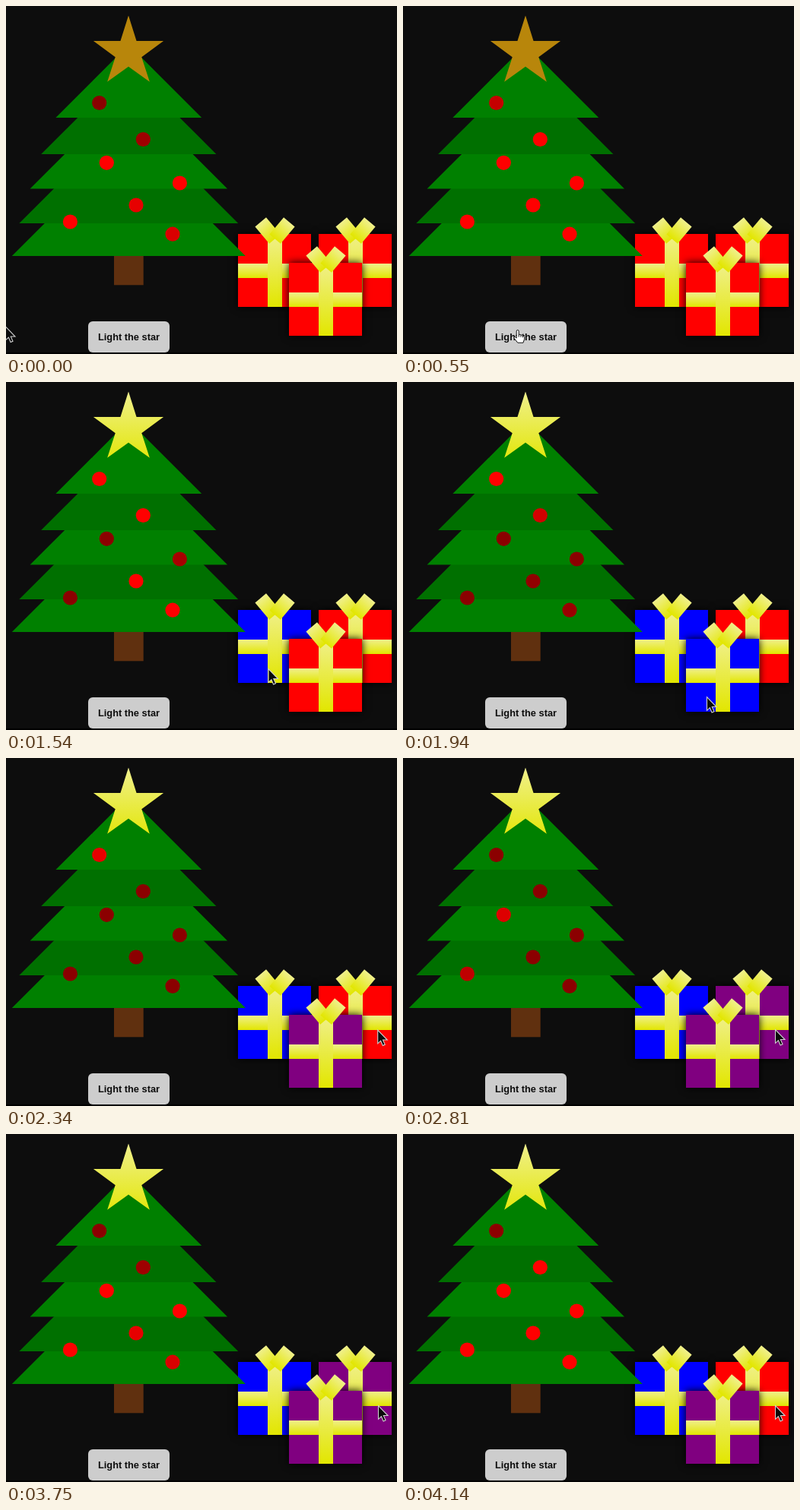
Animation, 514 px wide and 458 px high, one loop 4220 ms. Source, as an HTML page:

```html
<!DOCTYPE html>
<html lang="en">
<head>
<meta charset="utf-8">
<title>Light the star</title>
<style>
  html, body { margin: 0; width: 100%; height: 100%; overflow: hidden; background: #0d0d0d; }
  #stage { position: relative; width: 514px; height: 458px; overflow: hidden; background: #0d0d0d; --foil: linear-gradient(#f0f08c, #e2e600); }
  #stage::after { content: ""; position: absolute; left: 0; right: 0; top: 456px; height: 2px; background: #000; }
  svg { position: absolute; left: 0; top: 0; overflow: visible; }
  .star {
    position: absolute; left: 113px; top: 12.5px; width: 96px; height: 96px; background: #b8860b;
    clip-path: polygon(50% 0, 61% 35%, 98% 35%, 68% 57%, 79% 91%, 50% 70%, 21% 91%, 32% 57%, 2% 35%, 39% 35%);
  }
  .star.lit { background: var(--foil); }
  .gift { position: absolute; width: 96px; height: 96px; background: #f00; box-shadow: 0 0 10px #000; }
  .gift i { position: absolute; background: var(--foil); }
  .band { left: 0; top: 39px; width: 96px; height: 19px; }
  .post { left: 39px; top: 0; width: 19px; height: 96px; }
  .bow { left: 38.6px; top: -18.8px; width: 19.2px; height: 29px; }
  .bow.l { transform: translateX(-9.5px) rotate(-40deg); }
  .bow.r { transform: translateX(9.5px) rotate(40deg); }
  button {
    position: absolute; left: 108px; top: 415px; width: 107px; height: 41px; padding: 0;
    border: 0; border-radius: 6px; background: #cdcdcd; color: #0d0d0d;
    font: bold 12.8px "Liberation Sans", Arial, sans-serif; white-space: nowrap;
  }
  #cursor { z-index: 2; }
</style>
</head>
<body>
<div id="stage">
  <div class="gift" style="left:305px;top:300px"></div>
  <div class="gift" style="left:411px;top:300px"></div>
  <div class="gift" style="left:372px;top:338px"></div>
  <svg width="514" height="458">
    <path fill="#60300f" d="M142 328h38.7v39.2H142z"/>
    <g id="tree"></g>
    <g id="lights"></g>
  </svg>
  <div class="star"></div>
  <button type="button">Light the star</button>
  <svg id="cursor" width="20" height="22">
    <path id="arrow" d="M.5 0V17.8L4.4 14.2 7.1 20.4 10 19.1 7.3 13H13Z" fill="#0a0a0a" stroke="#d0d0d0" stroke-width="1.1"/>
    <path id="hand" d="M-.8 8.6V1.2Q-.8-.6 .7-.6T2.2 1.2V5.6Q4.2 4.7 5 6.1 6.7 5.4 7.5 6.9 9.6 6.5 9.6 8.6V11.4L8 16.2H.8L-3.6 10.6Q-4.6 8.9-3.2 8.4-2.4 8.2-.8 10Z M2.2 5.6V8.6M5 6.1V8.8M7.5 6.9V9.2" fill="#fff" stroke="#111" stroke-width="1"/>
  </svg>
</div>
<script>
const LOOP = 4220;
const BLINK = 3750, FADE = 400;
const TRAVEL = 340, PRESS = 140, REPEAT = 280;
const $ = s => document.querySelector(s);
const smooth = x => { x = Math.min(1, Math.max(0, x)); return x * x * (3 - 2 * x); };

// Five 45-degree tiers, widest first; the steps between them grow towards the top
function growTree() {
  const mid = 161.3;
  let base = 329, half = 153.5, shapes = '';
  for (let i = 0; i < 5; i++) {
    if (i) {
      const flare = 4 * ((i - 2.5) / 3) ** 3;
      base -= 45.5 + 5 * flare;
      half -= 14.4 + 9.6 * flare;
    }
    shapes += `<path fill="${i % 2 ? '#007000' : '#008000'}" d="M${mid - half} ${base}h${2 * half}l${-half} ${-half}z"/>`;
  }
  $('#tree').innerHTML = shapes;
}
growTree();

// Each bulb: place and the moment it brightens; all share one blink cycle
const bulbs = [
  [122.7, 127.5, 550], [180.3, 175.5, 95], [132.3, 206.3, -995], [228.4, 233, -410],
  [171, 262, -80], [84.4, 284, -925], [219, 300.2, -45]
];
$('#lights').innerHTML = bulbs.map(([x, y]) => `<circle cx="${x}" cy="${y}" r="9.6"/>`).join('');
const circles = document.querySelectorAll('#lights circle');

// Bright for half the cycle, dark for the other half, with soft edges
function glow(t, on) {
  const u = (t - on + FADE / 2 + BLINK) % BLINK;
  return smooth(u / FADE) - smooth((u - BLINK / 2) / FADE);
}

// Pointer stops in order of visit, with the number of clicks made there
const stops = [
  { x: -1, y: 422, at: 0 },
  { x: 150, y: 427, at: 520, clicks: 1 },
  { x: 312, y: 355.5, at: 1060, clicks: 1 },
  { x: 399, y: 414.5, at: 1740, clicks: 2 },
  { x: 489, y: 357.5, at: 2360, clicks: 6 }
];
const [, onButton, onLeft, onMiddle, onRight] = stops;

function clicked({ at, clicks }, t) {
  const n = Math.floor((t - at - PRESS) / REPEAT) + 1;
  return Math.min(clicks, Math.max(0, n));
}

function pointer(t) {
  return stops.reduce((p, s) => {
    const k = smooth((t - s.at + TRAVEL) / TRAVEL);
    return { x: p.x + (s.x - p.x) * k, y: p.y + (s.y - p.y) * k };
  }, stops[0]);
}

const wraps = ['#f00', '#00f', '#800080'];
const visits = [onLeft, onRight, onMiddle];
const gifts = document.querySelectorAll('.gift');
for (const g of gifts)
  g.innerHTML = '<i class="band"></i><i class="post"></i><i class="bow l"></i><i class="bow r"></i>';

function draw(t) {
  bulbs.forEach(([, , on], i) =>
    circles[i].setAttribute('fill', `rgb(${Math.round(139 + 116 * glow(t, on))},0,0)`));
  $('.star').classList.toggle('lit', clicked(onButton, t) > 0);
  gifts.forEach((g, i) => { g.style.backgroundColor = wraps[clicked(visits[i], t) % 3]; });

  const { x, y } = pointer(t);
  const over = x > 108 && x < 215 && y > 415;
  $('#cursor').style.transform = `translate(${x}px,${y}px)`;
  $('#arrow').style.display = over ? 'none' : '';
  $('#hand').style.display = over ? '' : 'none';
}

const start = performance.now();
function tick() {
  draw((performance.now() - start) % LOOP);
  requestAnimationFrame(tick);
}
tick();
</script>
</body>
</html>
```
